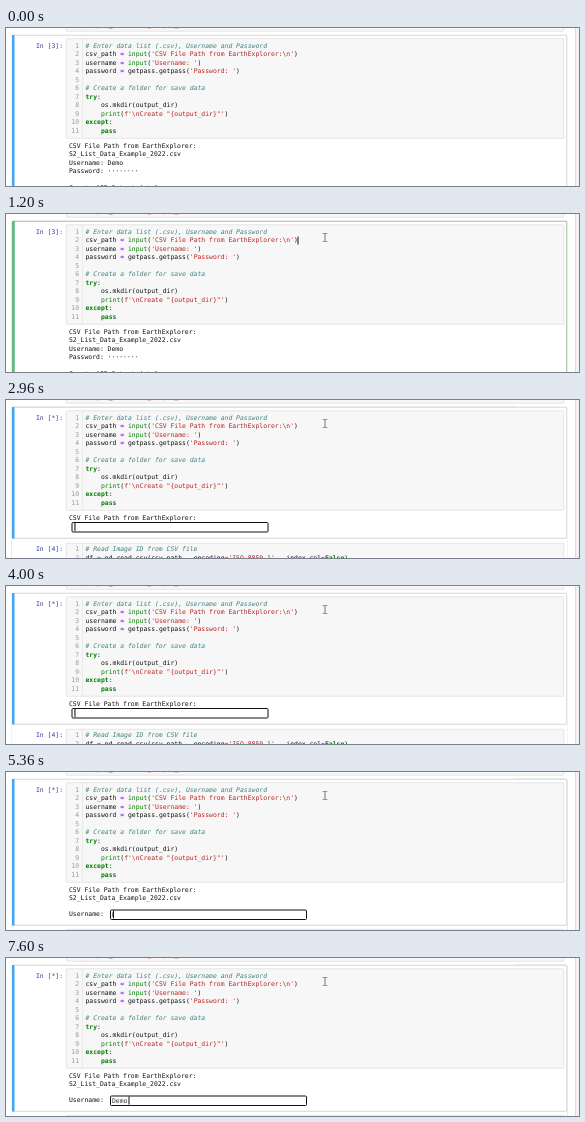
Animation of 573 by 158 pixels, one loop 8000 ms. Source, as an HTML page:

```html
<!DOCTYPE html>
<html lang="en">
<head>
<meta charset="utf-8">
<title>Notebook input</title>
<style>
html, body { margin: 0; width: 100%; height: 100%; overflow: hidden; background: #fff; }
/* Laid out at notebook size, shown at half scale */
#page {
  position: absolute; left: 0; top: 0; width: 1146px; height: 316px;
  overflow: hidden; background: #fff; transform: scale(.5); transform-origin: 0 0;
  font: 12.83px/17px "DejaVu Sans Mono", monospace; color: #111;
  text-rendering: geometricPrecision;
}
#page div, #page pre, #page svg { position: absolute; box-sizing: border-box; margin: 0; }
pre { font: inherit; white-space: pre; }
.state { left: 0; top: 0; width: 100%; height: 100%; }
.side { left: 1138px; top: 0; width: 8px; height: 316px; background: #f2f2f2; border-left: 2px solid #ddd; }

.cell { left: 12px; top: 14px; width: 1110px; border: 1px solid #ababab; border-radius: 2px; }
.cell::before {
  content: ""; position: absolute; left: -1px; top: -1px; bottom: -1px; width: 5px; background: #42a5f5;
}
.edit { border-color: #66bb6a; }
.edit::before { background: #66bb6a; }

.area { left: 120px; width: 996px; background: #f7f7f7; border: 1px solid #cfcfcf; border-radius: 2px; }
.area::before {
  content: ""; position: absolute; left: 0; top: 0; bottom: 0; width: 32px; border-right: 1px solid #ddd;
}
.nums { left: 122px; width: 24px; text-align: right; color: #999; }
.code { left: 159px; }
.out { left: 126px; }
.prompt { left: 60px; color: #303f9f; }
.c { color: #408080; font-style: italic; }
.k { color: #008000; font-weight: bold; }
.b { color: #008000; }
.s { color: #ba2121; }
.o { color: #aa22ff; font-weight: bold; }

.field { width: 394px; height: 21px; background: #fff; border: 2px solid #111; border-radius: 3px; padding-left: 2px; }
.typed {
  display: inline-block; overflow: hidden; height: 16px; vertical-align: top;
  white-space: pre; color: #333; border-right: 2px solid #111;
}

/* 1% = 80ms */
.idle, .edit, .path, .login, .caret, .path .typed, .login .typed { animation: 8s step-end infinite; }
.idle { animation-name: idle; }
.edit { animation-name: edit; }
.path { animation-name: path; }
.login { animation-name: login; }
.caret { animation-name: caret; left: 583px; top: 45px; width: 2px; height: 16px; background: #111; }
.path .typed { animation-name: paste, blinkPath; }
.login .typed { animation-name: type, blinkLogin; }
.mouse { left: 0; top: 0; width: 10px; height: 18px; animation: mouse 8s infinite; }

@keyframes idle { 0% { visibility: visible } 22%, 100% { visibility: hidden } }
@keyframes edit { 0%, 22%, 100% { visibility: hidden } 12% { visibility: visible } }
@keyframes caret { 0%, 18%, 100% { visibility: hidden } 12% { visibility: visible } }
@keyframes path { 0%, 67%, 100% { visibility: hidden } 22% { visibility: visible } }
@keyframes login { 0% { visibility: hidden } 67%, 100% { visibility: visible } }
@keyframes paste { 0% { width: 2px } 53%, 100% { width: calc(29ch + 2px) } }
@keyframes blinkPath {
  0%, 37%, 49% { border-color: #111 }
  28%, 43%, 60%, 100% { border-color: transparent }
}
@keyframes type {
  0% { width: 2px }
  89% { width: calc(1ch + 2px) }
  90% { width: calc(2ch + 2px) }
  92% { width: calc(3ch + 2px) }
  94%, 100% { width: calc(4ch + 2px) }
}
@keyframes blinkLogin {
  0%, 79%, 89%, 100% { border-color: #111 }
  73%, 85% { border-color: transparent }
}
@keyframes mouse {
  0%, 1.99% { transform: translate(596px, 320px); animation-timing-function: step-end }
  2% { transform: translate(596px, 310px); animation-timing-function: ease-out }
  5%, 100% { transform: translate(633px, 38px) }
}
</style>
</head>
<body>
<div id="page">
  <div class="side"></div>
  <div class="area" style="top:-40px;height:47px"></div>
  <pre class="code" style="top:-15px">output_dir <span class="o">=</span> <span class="s">'S2_Output_data'</span></pre>

  <div class="state idle">
    <div class="cell" style="height:330px"></div>
    <pre class="prompt" style="top:27px">In [3]:</pre>
    <pre class="out" style="top:227px">CSV File Path from EarthExplorer:
S2_List_Data_Example_2022.csv
Username: Demo
Password: ········

Create "S2_Output_data"</pre>
  </div>
  <div class="cell edit" style="height:330px"></div>

  <div class="state path">
    <div class="cell" style="height:263px"></div>
    <pre class="prompt" style="top:27px">In [*]:</pre>
    <pre class="out" style="top:227px">CSV File Path from EarthExplorer:</pre>
    <div class="field" style="left:131px;top:244px"><span class="typed">S2_List_Data_Example_2022.csv</span></div>
    <pre class="prompt" style="top:290px">In [4]:</pre>
    <div class="area" style="top:286px;height:60px"></div>
    <pre class="nums" style="top:290px">1
2</pre>
    <pre class="code" style="top:290px"><span class="c"># Read Image ID from CSV file</span>
df <span class="o">=</span> pd.read_csv(csv_path,  encoding<span class="o">=</span><span class="s">'ISO-8859-1'</span>,  index_col<span class="o">=</span><span class="k">False</span>)</pre>
  </div>

  <div class="state login">
    <div class="cell" style="height:293px"></div>
    <pre class="prompt" style="top:27px">In [*]:</pre>
    <pre class="out" style="top:227px">CSV File Path from EarthExplorer:
S2_List_Data_Example_2022.csv</pre>
    <pre class="out" style="top:276px">Username:</pre>
    <div class="field" style="left:208px;top:275px"><span class="typed">Demo</span></div>
    <div class="area" style="top:314px;height:40px"></div>
  </div>

  <div class="area" style="top:21px;height:200px"></div>
  <pre class="nums" style="top:27px">1
2
3
4
5
6
7
8
9
10
11</pre>
  <pre class="code" style="top:27px"><span class="c"># Enter data list (.csv), Username and Password</span>
csv_path <span class="o">=</span> <span class="b">input</span>(<span class="s">'CSV File Path from EarthExplorer:\n'</span>)
username <span class="o">=</span> <span class="b">input</span>(<span class="s">'Username: '</span>)
password <span class="o">=</span> getpass.getpass(<span class="s">'Password: '</span>)

<span class="c"># Create a folder for save data</span>
<span class="k">try</span>:
    os.mkdir(output_dir)
    <span class="b">print</span>(<span class="s">f'\nCreate "{output_dir}"'</span>)
<span class="k">except</span>:
    <span class="k">pass</span></pre>
  <div class="caret"></div>
  <svg class="mouse" viewBox="0 0 10 18"><path d="M1 1H4L5 2L6 1H9M5 2V16M1 17H4L5 16L6 17H9" fill="none" stroke="#555" stroke-width="1.6"/></svg>
</div>
</body>
</html>
```
